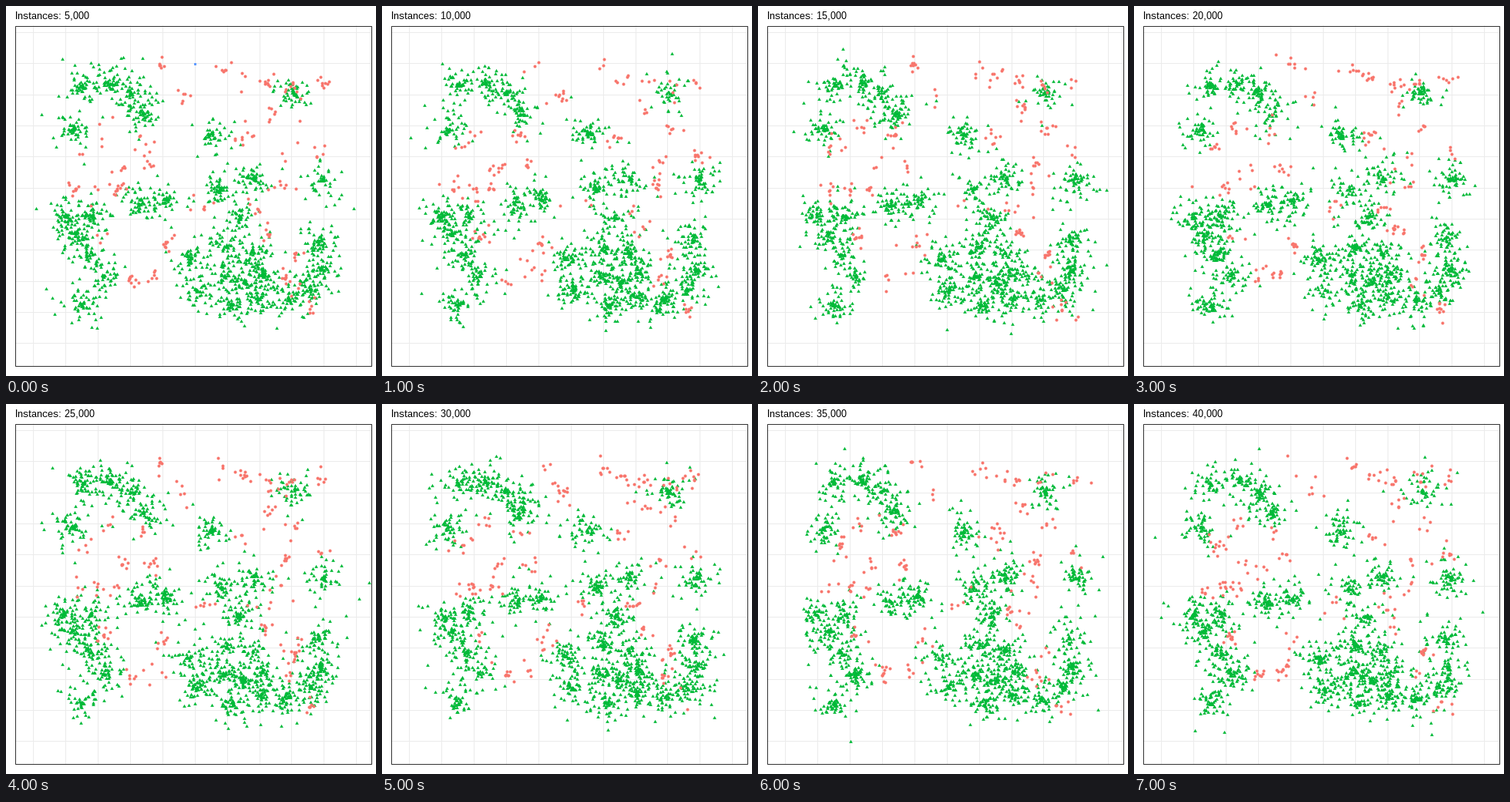
Recreate the animation shown at these times as a matplotlib script. Size 480 by 480 pixels, loop 8000 ms.

```python
import numpy as np
import matplotlib.pyplot as plt
from matplotlib.animation import FuncAnimation
from matplotlib.patches import Rectangle

SIZE, DPI = 480, 80
PX = 72 / DPI  # points per pixel
STEPS, INTERVAL, BATCH = 8, 1000, 5000
GREEN, RED, BLUE = "#00BA38", "#F8766D", "#619CFF"

plt.rcParams["text.hinting"] = "native"
plt.rcParams["text.hinting_factor"] = 1


def spot(x, y):
    return np.array([[x, y]])


def arc(n, start, end, bend=None):
    """n centres spread along a quadratic curve, straight without a bend."""
    a, c = np.array(start), np.array(end)
    b = (a + c) / 2 if bend is None else np.array(bend)
    t = np.linspace(0, 1, n)[:, None]
    return (1 - t) ** 2 * a + 2 * t * (1 - t) * b + t ** 2 * c


def green_centres():
    return np.vstack([
        arc(4, (98, 103), (178, 140), bend=(160, 88)),
        arc(2, (172, 257), (206, 251)),
        arc(2, (278, 238), (321, 223)),
        arc(2, (76, 273), (111, 272)),
        arc(3, (90, 295), (126, 350)),
        arc(2, (238, 328), (247, 368)),
        arc(4, (302, 275), (292, 388), bend=(269, 332)),
        arc(3, (320, 320), (330, 377), bend=(340, 344)),
        arc(4, (366, 380), (403, 304), bend=(422, 370)),
        spot(86, 160), spot(266, 165), spot(372, 112),
        spot(411, 225), spot(98, 388), spot(308, 358)])


def red_centres():
    return np.vstack([
        arc(2, (199, 75), (230, 115)),
        arc(5, (284, 82), (408, 98), bend=(330, 108)),
        arc(2, (342, 132), (374, 157)),
        arc(3, (105, 182), (178, 166), bend=(125, 140)),
        arc(2, (150, 208), (188, 208)),
        arc(3, (93, 238), (143, 236)),
        arc(2, (360, 202), (355, 235)),
        arc(2, (325, 262), (338, 290)),
        arc(3, (160, 352), (206, 308), bend=(200, 360)),
        arc(3, (374, 322), (394, 392), bend=(345, 350)),
        spot(306, 170), spot(409, 193), spot(258, 258), spot(126, 300)])


def cloud(rng, centres, count, spread):
    """Pick centres at random; offset by a random direction and normal radius."""
    base = centres[rng.integers(len(centres), size=count)]
    angle = rng.uniform(0, 2 * np.pi, count)
    radius = rng.normal(0, spread, count)
    shift = radius[:, None] * np.column_stack([np.cos(angle), np.sin(angle)])
    return np.floor(base + shift) + 0.5


fig = plt.figure(figsize=(SIZE / DPI, SIZE / DPI), dpi=DPI, facecolor="white")
ax = fig.add_axes([0, 0, 1, 1])
ax.set(xlim=(0, SIZE), ylim=(SIZE, 0))
ax.axis("off")

grid = dict(color="#EBEBEB", lw=PX, snap=False, zorder=1)
for i in range(11):
    x = round(35.3 + 41.9 * i) + 0.5
    y = round(34.2 + 40.3 * i) + 0.5
    ax.plot([x, x], [26, 467], **grid)
    ax.plot([12, 474], [y, y], **grid)
ax.add_patch(Rectangle((12.5, 26.5), 462, 441, fill=False, ec="#333333",
                       lw=PX, snap=False, zorder=5))


def markers(shape, width, color, zorder):
    return ax.scatter([], [], s=(width * PX) ** 2, marker=shape, color=color,
                      linewidths=0, antialiased=False, zorder=zorder)


triangles = markers((3, 0, 0), 5.4, GREEN, 2)
dots = markers("o", 4, RED, 3)
lone = markers("s", 3, BLUE, 4)
lone.set_offsets([(244.5, 74.5)])
title = ax.text(11.5, 17, "", family="Liberation Sans", fontsize=13.1 * PX,
                color="black", va="baseline")

greens, reds = green_centres(), red_centres()


def update(step):
    rng = np.random.default_rng(40 + step)
    triangles.set_offsets(cloud(rng, greens, 1750, 17))
    dots.set_offsets(cloud(rng, reds, 190, 10))
    lone.set_visible(step == 0)
    title.set_text(f"Instances: {BATCH * (step + 1):,}")
    return triangles, dots, lone, title


anim = FuncAnimation(fig, update, frames=STEPS, interval=INTERVAL, repeat=True)
plt.show()
```
